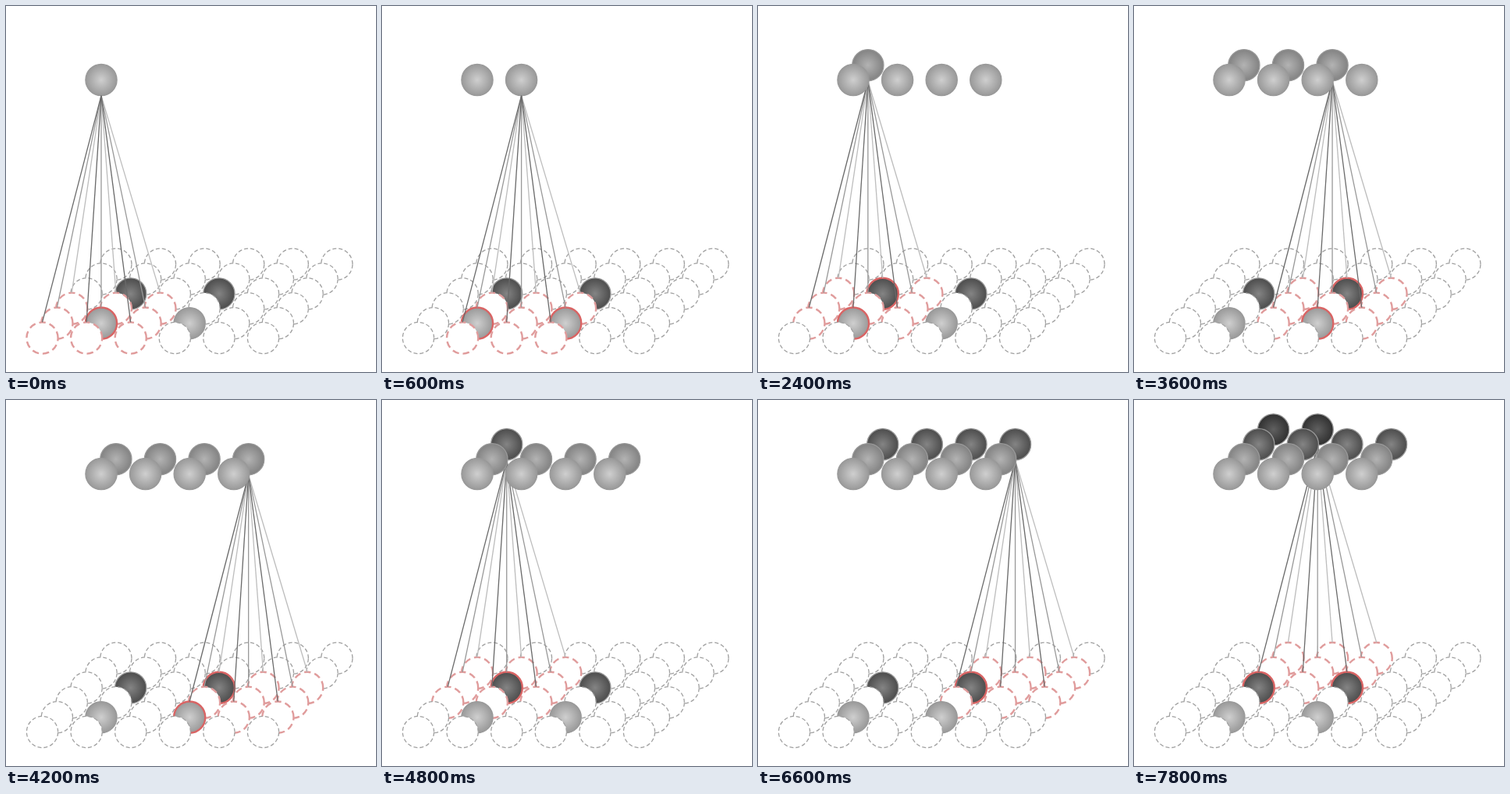
Recreate the animation shown at these times as an HTML page with a canvas. Size 474 by 468 pixels, loop 8000 ms.

```html
<!DOCTYPE html>
<html lang="en">
<head>
<meta charset="utf-8">
<title>Sliding window</title>
<style>
html, body { margin: 0; width: 100%; height: 100%; overflow: hidden; background: #fff; }
canvas { display: block; width: 474px; height: 468px; }
</style>
</head>
<body>
<canvas id="stage"></canvas>
<script>
const W = 474, H = 468, LOOP = 8000, STEP = 600;
const DX = 56.6, SHIFT = 18.87, R = 20.1;
const OUT_COLS = 4, SIZE = 6, KERNEL = 3;

// [centre, rim] of each ball tone, front row to back row
const TONES = [
  ['#cfcfcf', '#999999'],
  ['#b3b3b3', '#828282'],
  ['#848484', '#4c4c4c'],
  ['#606060', '#303030']
];
const LINE_TONES = ['#6a6a6a', '#999999', '#bdbdbd'];

const canvas = document.getElementById('stage');
const ctx = canvas.getContext('2d');
const ratio = window.devicePixelRatio || 1;
canvas.width = W * ratio;
canvas.height = H * ratio;
ctx.scale(ratio, ratio);

const place = (x, y) => (row, col) => [x + DX * col + SHIFT * row, y - SHIFT * row];
const inputAt = place(46.5, 424.5);
const outputAt = place(122, 94.5);

function circle([x, y], fill, stroke, width, dash = []) {
  ctx.beginPath();
  ctx.arc(x, y, R, 0, -2 * Math.PI, true);
  ctx.fillStyle = fill;
  ctx.fill();
  ctx.setLineDash(dash);
  ctx.strokeStyle = stroke;
  ctx.lineWidth = width;
  ctx.stroke();
}

function ball(pos, [centre, rim], active) {
  const [x, y] = pos;
  const shade = ctx.createRadialGradient(x, y, 0, x, y, R);
  shade.addColorStop(0, centre);
  shade.addColorStop(1, rim);
  circle(pos, shade, active ? '#d96464' : '#999', active ? 2.4 : 1.3);
}

function drawInput(row, col) {
  for (let r = SIZE - 1; r >= 0; r--) {
    for (let c = 0; c < SIZE; c++) {
      const active = r >= row && r < row + KERNEL && c >= col && c < col + KERNEL;
      const pos = inputAt(r, c);
      const solid = (r === 1 || r === 3) && (c === 1 || c === 3);
      if (solid) ball(pos, TONES[r - 1], active);
      else if (active) circle(pos, '#fff', '#e09c9c', 2.4, [8.5, 5]);
      else circle(pos, '#fff', '#a0a0a0', 1.3, [5, 3]);
    }
  }
}

function drawLines(row, col) {
  const [x, y] = outputAt(row, col);
  ctx.setLineDash([]);
  ctx.lineWidth = 1.3;
  for (let r = KERNEL - 1; r >= 0; r--) {
    ctx.strokeStyle = LINE_TONES[r];
    for (let c = 0; c < KERNEL; c++) {
      const [ex, ey] = inputAt(row + r, col + c);
      ctx.beginPath();
      ctx.moveTo(x, y + R);
      ctx.lineTo(ex, ey - R);
      ctx.stroke();
    }
  }
}

function draw(step) {
  const row = Math.floor(step / OUT_COLS), col = step % OUT_COLS;
  ctx.fillStyle = '#fff';
  ctx.fillRect(0, 0, W, H);
  drawInput(row, col);
  for (let r = row; r >= 0; r--) {
    const last = r === row ? col : OUT_COLS - 1;
    for (let c = 0; c <= last; c++) ball(outputAt(r, c), TONES[r], false);
    if (r === row) drawLines(row, col);
  }
}

const start = performance.now();
let shown = -1;
function tick() {
  const step = Math.floor(((performance.now() - start) % LOOP) / STEP);
  if (step !== shown) draw(shown = step);
  requestAnimationFrame(tick);
}
tick();
</script>
</body>
</html>
```
